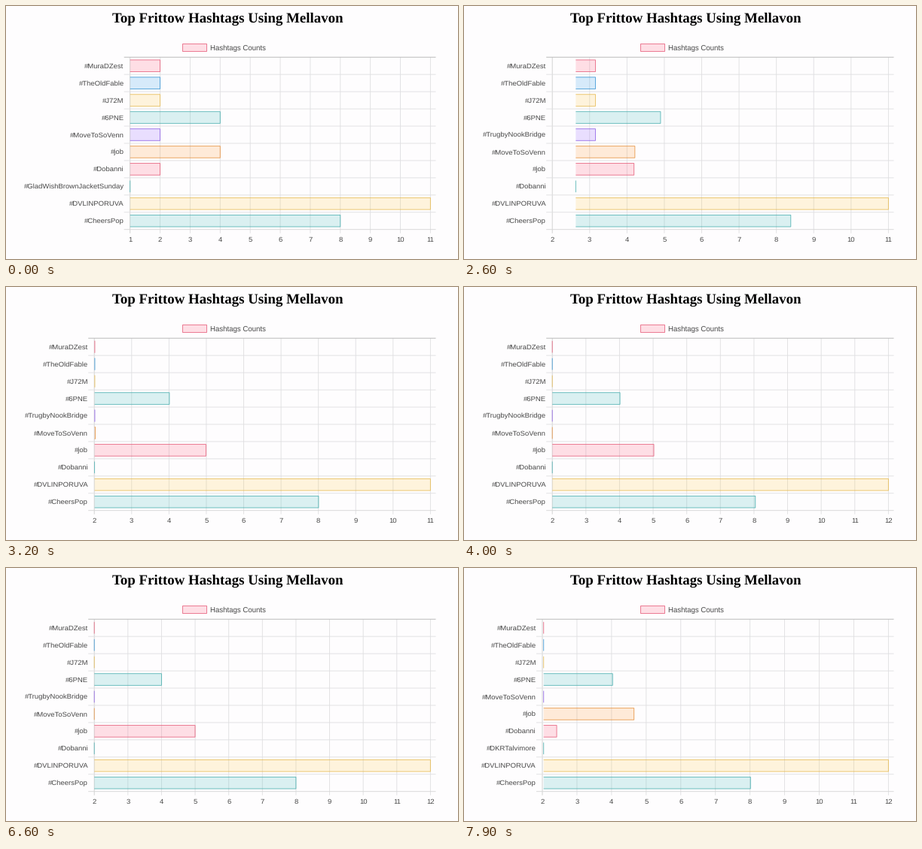
Write a matplotlib script that moves like this. It is 600 px wide and 337 px high and loops after 8000 ms.

```python
import matplotlib.pyplot as plt
from matplotlib.animation import FuncAnimation
from matplotlib.collections import LineCollection
from matplotlib.patches import Rectangle

W, H, DPI = 600, 337, 100
FPS, FRAMES = 10, 80
TOP, PITCH, ROWS = 68.2, 22.95, 10
BOTTOM = TOP + PITCH * ROWS
LAST_TICK, RIGHT = 563.4, 570.5
LINE = 0.9
BAR_H = PITCH * 0.72 - LINE
PX = 72 / DPI
TEXT = "#484848"

plt.rcParams["text.hinting"] = "none"

PINK, BLUE, YELLOW = (255, 99, 132), (54, 162, 235), (255, 206, 86)
TEAL, PURPLE, ORANGE = (75, 192, 192), (153, 102, 255), (255, 159, 64)
COLORS = [PINK, BLUE, YELLOW, TEAL, PURPLE, ORANGE, PINK, TEAL, YELLOW, TEAL]

HEAD = ["#MuraDZest", "#TheOldFable", "#J72M", "#6PNE"]
TAIL = ["#DVLINPORUVA", "#CheersPop"]
ROAD, CITY = "#MoveToSoVenn", "#Dobanni"
BRIDGE_ROWS = HEAD + ["#TrugbyNookBridge", ROAD, "#job", CITY] + TAIL


class View:
    """One state of the chart: labels, values and axis layout."""

    def __init__(self, start, left, lo, hi, labels, values):
        self.start, self.left, self.lo, self.hi = start, left, lo, hi
        self.labels = labels
        self.ends = [self.x(v) for v in values]

    def x(self, value):
        return self.left + (value - self.lo) * (LAST_TICK - self.left) / (self.hi - self.lo)


VIEWS = [
    View(-1.0, 164.7, 1, 11,
         HEAD + [ROAD, "#job", CITY, "#GladWishBrownJacketSunday"] + TAIL,
         [2, 2, 2, 4, 2, 4, 2, 1, 11, 8]),
    View(2.5, 117.2, 2, 11, BRIDGE_ROWS, [2, 2, 2, 4, 2, 2, 5, 2, 11, 8]),
    View(3.5, 117.2, 2, 12, BRIDGE_ROWS, [2, 2, 2, 4, 2, 2, 5, 2, 12, 8]),
    View(7.5, 104.0, 2, 12,
         HEAD + [ROAD, "#job", CITY, "#DKRTalvimore"] + TAIL,
         [2, 2, 2, 4, 2, 5, 2, 2, 12, 8]),
]


def rgb(color, alpha=1.0):
    return tuple(c / 255 for c in color) + (alpha,)


def edge_color(color):
    return rgb([c * 0.9 for c in color], 0.85)


fig = plt.figure(figsize=(W / DPI, H / DPI), dpi=DPI, facecolor="#fefdfe")
ax = fig.add_axes([0, 0, 1, 1])
ax.set_xlim(0, W)
ax.set_ylim(H, 0)
ax.axis("off")


def text(x, y, s="", size=9.5, ha="left", color=TEXT, family="Liberation Sans", **kw):
    return ax.text(x, y, s, fontsize=size * PX, ha=ha, va="baseline",
                   color=color, family=family, **kw)


def row_y(i):
    return TOP + PITCH * (i + 0.5)


text(293.8, 22, "Top Frittow Hashtags Using Mellavon", 18.85, "center", "black",
     "Liberation Serif", weight="bold")
ax.add_patch(Rectangle((234.5, 50.5), 32, 10, facecolor=rgb(PINK, 0.2),
                       edgecolor=edge_color(PINK), linewidth=LINE * PX, snap=False))
text(271, 59.4, "Hashtags Counts", 9.6)

grid = LineCollection([], linewidths=LINE * PX, zorder=1)
grid.set_snap(False)
ax.add_collection(grid)
labels = [text(0, row_y(i) + 3.0, ha="right") for i in range(ROWS)]
ticks = [text(0, 314, ha="center") for _ in range(11)]

fills, edges = [], []
for i, color in enumerate(COLORS):
    fill = Rectangle((0, row_y(i) - BAR_H / 2), 0, BAR_H, snap=False,
                     facecolor=rgb(color, 0.2), edgecolor="none", zorder=2)
    fills.append(ax.add_patch(fill))
    edges += ax.plot([], [], color=edge_color(color), lw=LINE * PX, zorder=3,
                     snap=False, solid_joinstyle="miter", solid_capstyle="butt")


def draw_axes(view):
    xs = [view.x(v) for v in range(view.lo, view.hi + 1)]
    ys = [TOP + PITCH * i for i in range(ROWS + 1)]
    grid.set_segments([[(x, TOP), (x, BOTTOM + 5)] for x in xs]
                      + [[(view.left - 8, y), (RIGHT, y)] for y in reversed(ys)])
    grid.set_color(["#cfcfcf"] + ["#e0e0e2"] * (len(xs) - 1)
                   + ["#d6d6d6"] + ["#e0e0e2"] * (ROWS - 1) + ["#b4b4b4"])
    for label, name in zip(labels, view.labels):
        label.set_text(name)
        label.set_x(view.left - 8)
    for k, tick in enumerate(ticks):
        shown = k < len(xs)
        tick.set_text(str(view.lo + k) if shown else "")
        tick.set_x(xs[k] if shown else 0)


def update(n):
    now = n / FPS
    k = max(i for i, v in enumerate(VIEWS) if v.start <= now)
    view, old = VIEWS[k], VIEWS[max(k - 1, 0)]
    rest = (1 - min(now - view.start, 1)) ** 4  # quartic ease-out, one second
    draw_axes(view)
    base = view.left + (old.left - view.left) * rest
    for i in range(ROWS):
        end = view.ends[i] + (old.ends[i] - view.ends[i]) * rest
        y0, y1 = row_y(i) - BAR_H / 2, row_y(i) + BAR_H / 2
        fills[i].set_x(base)
        fills[i].set_width(end - base)
        edges[i].set_data([base, end, end, base], [y0, y0, y1, y1])
    return []


anim = FuncAnimation(fig, update, frames=FRAMES, interval=1000 / FPS,
                     repeat=True, repeat_delay=0, blit=False)
plt.show()
```
